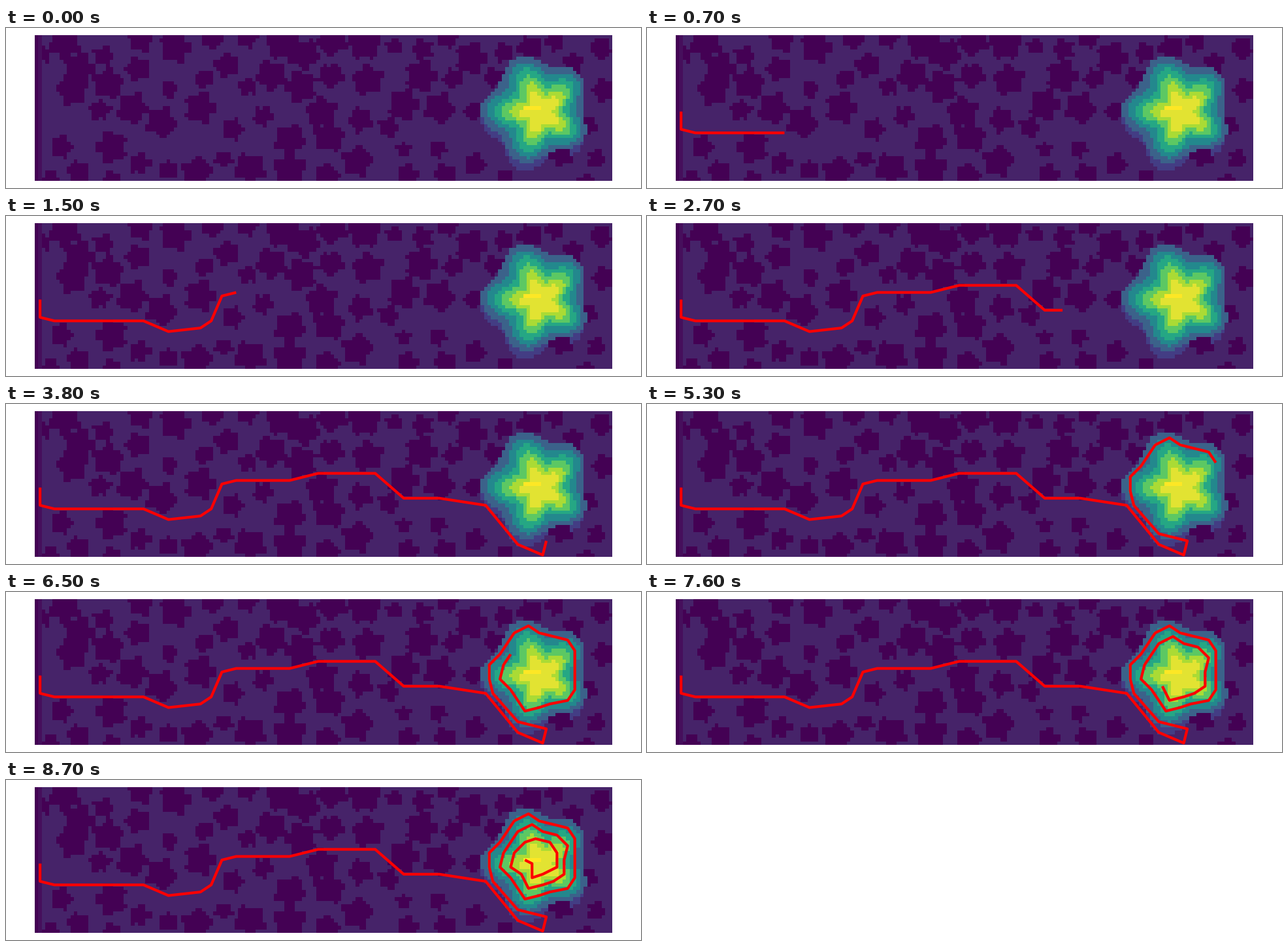
These frames come from a looping animation (972x246 px, 10 s). A matplotlib script:

```python
import numpy as np
import matplotlib.pyplot as plt
from matplotlib.animation import FuncAnimation
from matplotlib.colors import ListedColormap

WIDTH, HEIGHT, DPI = 972, 246, 100
ROWS, COLS = 41, 162
FRAMES, INTERVAL = 100, 100
STRIDE = 5  # grid cells travelled per step

PATCH, BORDER, FLOOR, SHADOW, FIRST_RING = range(5)
RING_COLORS = ["#3b628a", "#23888d", "#25a784",
               "#5cc863", "#aadb35", "#e2e332"]
PEAK = FIRST_RING + len(RING_COLORS)
COLORS = ["#440154", "#460f5c", "#462369", "#433d84", *RING_COLORS, "#fde725"]
LOBE_ANGLE = np.radians(38)

# Main dark clumps (column, row); the gaps between them fill at random.
CLUMPS = [(8, 2), (12, 9), (10, 15), (20, 13), (21, 31), (27, 20), (35, 24),
          (39, 3), (46, 20), (45, 38), (60, 37), (66, 11), (69, 2), (75, 5),
          (74, 14), (71, 29), (71, 37), (80, 21), (82, 28), (90, 35), (83, 1),
          (92, 2), (93, 12), (103, 19), (108, 11), (113, 20), (122, 6)]

APPROACH = [(1, 21), (1, 26), (5, 27), (30, 27), (37, 30), (46, 29), (49, 27),
            (52, 20), (56, 19), (71, 19), (79, 17), (95, 17), (103, 24),
            (113, 24), (126, 26), (135, 37), (142, 40), (143, 36), (135, 34),
            (128, 26)]
FINISH = [(139, 21), (137, 20)]


def walk(corners):
    """Split each leg into steps of about one stride, measured city-block."""
    corners = np.array(corners, float)
    points = [corners[0]]
    for start, end in zip(corners, corners[1:]):
        steps = max(1, round(np.abs(end - start).sum() / STRIDE))
        points += [start + (end - start) * k / steps
                   for k in range(1, steps + 1)]
    return np.array(points)


def spiral(steps=42):
    """Wind inwards with even steps, following the lobes of the peak."""
    radius = np.sqrt(165 - 3.55 * np.arange(steps))
    theta = np.radians(171) + 2.11 * (radius[0] - radius)
    lobed = radius * (1 + 0.11 * np.cos(5 * (theta + LOBE_ANGLE)))
    return np.round(np.column_stack([140.5 + lobed * np.cos(theta),
                                     20 + lobed * np.sin(theta)]))


def star_mask(col, row, radius, depth, angle):
    """Cells inside a rounded five-lobed star."""
    y, x = np.mgrid[:ROWS, :COLS]
    dx, dy = x - col, row - y
    edge = radius * (1 + depth * np.cos(5 * (np.arctan2(dy, dx) - angle)))
    return np.hypot(dx, dy) <= edge


def scatter_patches(rng, route):
    """Clumps first, then small patches clear of them and of the route."""
    patches = [(col, row, 4.1) for col, row in CLUMPS]
    for _ in range(600):
        spot = rng.uniform((1, 0), (COLS, ROWS))
        gaps = np.hypot(*(np.array(patches)[:, :2] - spot).T)
        if gaps.min() > 7 and np.hypot(*(route - spot).T).min() > 3.5:
            patches.append((*spot, rng.uniform(2, 3.3)))
    return patches


def build_field(route):
    rng = np.random.default_rng(4)
    field = np.full((ROWS, COLS), FLOOR)
    field[star_mask(140, 23, 13.5, 0.12, LOBE_ANGLE)] = SHADOW
    for col, row, radius in scatter_patches(rng, route):
        angle = rng.uniform(0, 2 * np.pi)
        field[star_mask(col, row, radius, 0.17, angle)] = PATCH
    field[:, 0] = PATCH
    field[:, 1] = BORDER
    count = len(RING_COLORS)
    rings = zip(np.linspace(140.3, 141.4, count), np.linspace(20.3, 21, count),
                np.linspace(14.2, 4.7, count), np.linspace(0.1, 0.3, count))
    for level, ring in enumerate(rings, FIRST_RING):
        field[star_mask(*ring, LOBE_ANGLE)] = level
    field[20, 137:142] = PEAK
    return field


path = np.vstack([walk(APPROACH), spiral(), FINISH])

fig = plt.figure(figsize=(WIDTH / DPI, HEIGHT / DPI), dpi=DPI,
                 facecolor="white")
ax = fig.add_axes([44 / WIDTH, 11 / HEIGHT, 884 / WIDTH, 224 / HEIGHT])
ax.axis("off")
ax.imshow(build_field(path), cmap=ListedColormap(COLORS), vmin=0, vmax=PEAK,
          aspect="auto", interpolation="nearest")
ax.set_autoscale_on(False)
line, = ax.plot([], [], color="red", lw=3, solid_capstyle="butt")


def update(frame):
    visible = path[:frame + 1] if frame else path[:0]
    line.set_data(visible[:, 0], visible[:, 1])
    return line,


anim = FuncAnimation(fig, update, frames=FRAMES, interval=INTERVAL,
                     repeat=True, repeat_delay=0)
plt.show()
```
